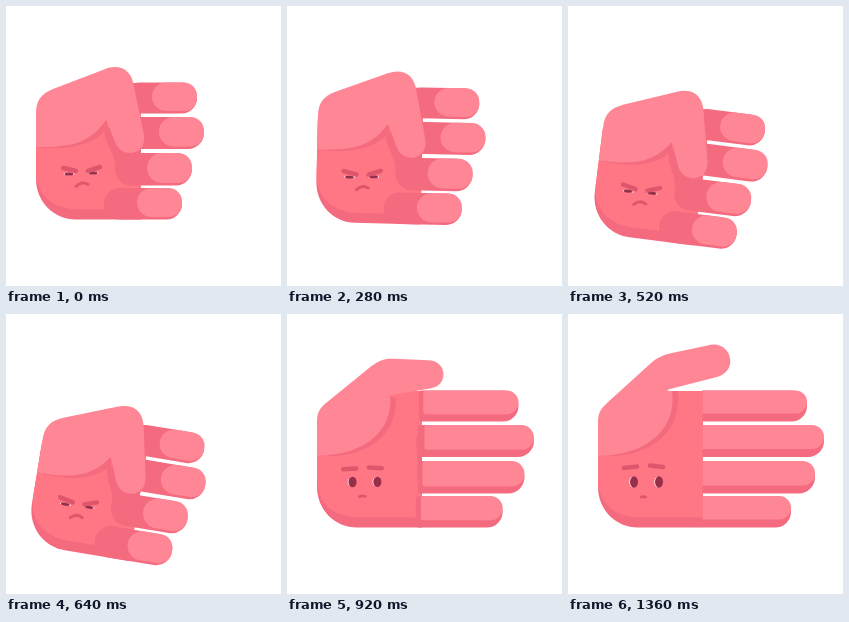
Animation, 275 px wide and 280 px high, one loop 1400 ms. Source, as an HTML page with a canvas:

```html
<!DOCTYPE html>
<html lang="en">
<head>
<meta charset="utf-8">
<title>Fist opens</title>
<style>
  html, body { margin: 0; width: 100%; height: 100%; overflow: hidden; background: #fff; }
  canvas { display: block; }
</style>
</head>
<body>
<canvas id="stage" width="275" height="280"></canvas>
<script>
const ctx = document.getElementById('stage').getContext('2d');
const LOOP = 1400, STEP = 40;
const LIGHT = '#ff8795', PALM = '#ff7685', DARK = '#f46a7e', BROW = '#dd566c', EYE = '#96304a';

// Light part of the hand, thumb included: closed and open pose share one command list.
const THUMB_CMDS = 'MLCLCLCLCC';
const THUMB_CLOSED = [30,141, 30,108, 30,94, 35,88, 47,83, 98,63.5, 112,58, 123,62, 127,76, 138,129,
  141,150, 115,153, 109,136, 102,118, 101,115, 100,114, 100,114, 85,136, 66,142, 30,141];
const THUMB_OPEN = [30,142, 30,108, 30,98, 33,95, 39,89, 82,50, 90,43, 95,41, 104,39, 142,31,
  164,27, 171,58, 149,63, 106,74, 98,76, 97,77, 104,77, 109,110, 85,141, 30,142];
const THUMB_POINTS = 14; // points before this one lift with the thumb

const FINGERS = [
  { y: 76.5, h: 31, root: 118, closed: 191, open: 239 },
  { y: 111, h: 32, root: 112, closed: 198, open: 256 },
  { y: 147, h: 32.5, root: 109, closed: 186, open: 247 },
  { y: 182, h: 31.5, root: 98, closed: 176, open: 223 },
];

const lerp = (a, b, k) => a + (b - a) * k;
const clamp = v => Math.min(1, Math.max(0, v));
const smooth = v => { v = clamp(v); return v * v * (3 - 2 * v); };

function swingAngle(t) {
  if (t <= 40 || t > 880) return 0;
  if (t < 120) return 7.3 * ((t - 40) / 80) ** 2;
  return 14.2 * Math.sin((t - 86) / 400 * 2 * Math.PI);
}

function overshoot(t) {
  return t < 1040 ? smooth((t - 920) / 100) : Math.exp(-(t - 1040) / 60);
}

function fill(path, color) {
  ctx.fillStyle = color;
  ctx.fill(new Path2D(path));
}

function bar(x, y, right, h, radii, color) {
  ctx.fillStyle = color;
  ctx.beginPath();
  ctx.roundRect(x, y, Math.max(0, right - x), h, radii);
  ctx.fill();
}

function line(x1, y1, x2, y2, bend, width) {
  ctx.lineWidth = width;
  ctx.lineCap = 'round';
  ctx.strokeStyle = BROW;
  ctx.beginPath();
  ctx.moveTo(x1, y1);
  ctx.quadraticCurveTo((x1 + x2) / 2, (y1 + y2) / 2 + bend, x2, y2);
  ctx.stroke();
}

function ellipse(x, y, rx, ry, color) {
  ctx.fillStyle = color;
  ctx.beginPath();
  ctx.ellipse(x, y, rx, ry, 0, 0, 2 * Math.PI);
  ctx.fill();
}

function drawPalm(e) {
  fill('M30 110V173C30 196 48 213.5 70 213.5H135V77H104Z', DARK);
  fill('M30 110V165C30 190 48 203.5 72 203.5H135V77H104Z', PALM);
  // Shadow between the thumb and the curled fingers.
  const x = v => lerp(v, 135, e);
  fill(`M${x(98)} 122C${x(99)} 143 ${x(110)} 143 ${x(109)} 165L135 178V122Z`, DARK);
}

function drawFinger({ y, h, root, closed, open }, e, extra) {
  const right = lerp(closed, open, e) + 3 * extra;
  const r = h / 2, left = r * (1 - e), lightH = h - lerp(2.5, 8, e);
  ctx.save();
  ctx.translate(135, y);
  ctx.rotate(-0.012 * extra);
  ctx.translate(-135, -y);
  bar(lerp(root, 134.5, e), y, right, h, [left, r, r, left], DARK);
  bar(lerp(closed - 45, 134.5, e), y, right, lightH, [left, lightH / 2, lightH / 2, left], LIGHT);
  ctx.restore();
}

function drawThumb(e, extra) {
  const mix = (a, b) => lerp(a, b, e);
  fill(`M30 ${mix(141, 142)}C${mix(66, 72)} ${mix(145, 145)} ${mix(90, 114)} ${mix(138, 126)}
    ${mix(102, 110)} ${mix(121, 77)}L${mix(99, 103)} ${mix(110, 77)}Z`, DARK);

  let i = 0;
  const point = () => {
    const x = mix(THUMB_CLOSED[2 * i], THUMB_OPEN[2 * i]);
    const y = mix(THUMB_CLOSED[2 * i + 1], THUMB_OPEN[2 * i + 1]);
    const lift = i++ < THUMB_POINTS ? extra * clamp((x - 30) / 90) : 0;
    return `${x - 9 * lift} ${y - 11 * lift} `;
  };
  let path = '';
  for (const cmd of THUMB_CMDS) path += cmd + (cmd === 'C' ? point() + point() + point() : point());
  fill(path + 'Z', LIGHT);
}

function drawFace(e) {
  const mix = (a, b) => lerp(a, b, e);
  for (const [x, y] of [[mix(63, 66), 168], [mix(87, 91), mix(167, 168)]]) {
    ellipse(x - mix(0, 1), y, mix(5.5, 3.7), mix(1.2, 5.2), '#fff');
    ellipse(x, y, mix(4.5, 4), mix(1.5, 5.8), EYE);
  }
  line(mix(57, 56), mix(162, 154), mix(70, 69), mix(165, 152.5), 0, 4.5);
  line(mix(82, 82), mix(165, 151.5), mix(94, 95), mix(161, 153), 0, 4.5);
  line(mix(70, 73), mix(180.5, 183), mix(82, 77.5), mix(178.5, 183), mix(-5, -0.5), 2.8);
}

function draw(t) {
  const angle = swingAngle(t) * Math.PI / 180;
  const e = smooth((t - 800) / 160), extra = overshoot(t);
  ctx.clearRect(0, 0, 275, 280);
  ctx.save();
  ctx.translate(30, 148 + 105 * Math.sin(angle));
  ctx.rotate(angle);
  ctx.translate(-30, -148);
  drawPalm(e);
  for (const finger of FINGERS) drawFinger(finger, e, extra);
  drawThumb(e, extra);
  drawFace(e);
  ctx.restore();
}

function tick() {
  draw(Math.floor(performance.now() % LOOP / STEP) * STEP);
  requestAnimationFrame(tick);
}
tick();
</script>
</body>
</html>
```
